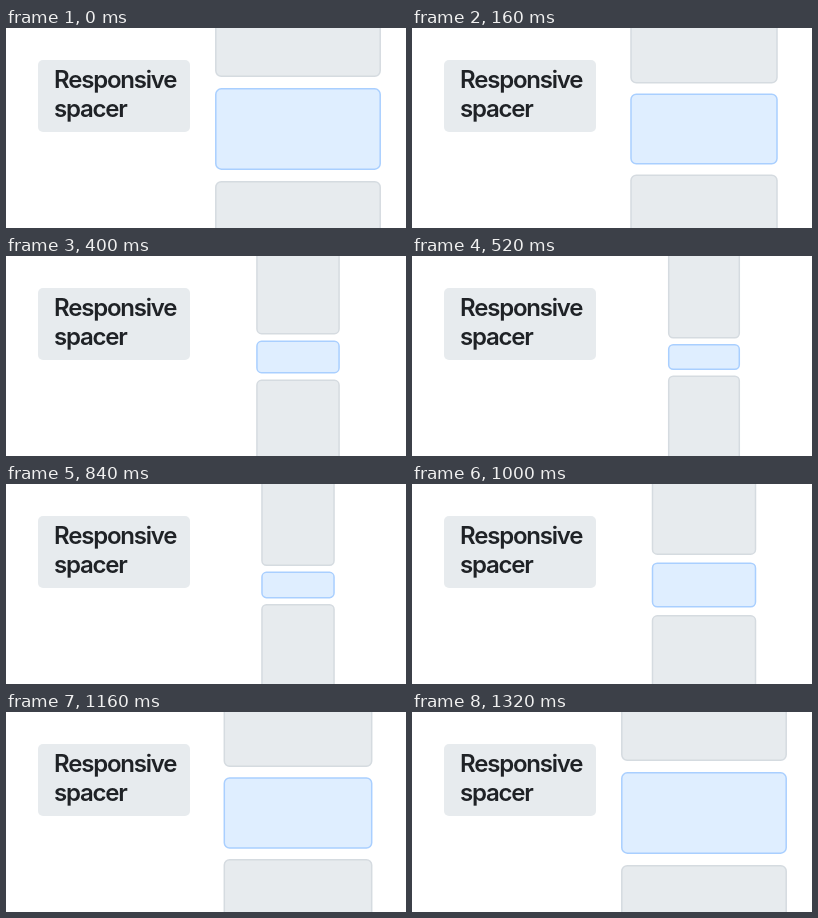
Recreate the animation shown at these times as an HTML page. Size 400 by 200 pixels, loop 1.52 s.

```html
<!DOCTYPE html>
<html lang="en">
<head>
<meta charset="utf-8">
<title>Responsive spacer</title>
<style>
  html, body { margin: 0; width: 100%; height: 100%; overflow: hidden; background: #fff; }
  svg { display: block; width: 400px; height: 200px; }
  text { font: 600 24px Inter, sans-serif; letter-spacing: -1.2px; fill: #1f2226; }
  .block { fill: #e7ebee; stroke: #d5dbe0; stroke-width: 1.5; }
  .spacer { fill: #dfeeff; stroke: #a9cfff; stroke-width: 1.5; }
</style>
</head>
<body>
<svg viewBox="0 0 400 200">
  <rect x="32" y="32" width="152" height="72" rx="5" fill="#e7ebee"/>
  <text x="48" y="60">Responsive</text>
  <text x="48" y="89">spacer</text>
  <rect id="above" class="block"/>
  <rect id="spacer" class="spacer"/>
  <rect id="below" class="block"/>
</svg>
<script>
const LOOP = 1520, STEP = 40, DURATION = 500;
const SHRINK_AT = 14, GROW_AT = 800;
const CENTER_X = 292, CENTER_Y = 101, BLOCK_HEIGHT = 200;
const [above, spacer, below] = ['above', 'spacer', 'below'].map(id => document.getElementById(id));

const mix = (a, b, p) => a + (b - a) * p;

function ease(elapsed) {
  const t = Math.min(1, Math.max(0, elapsed / DURATION));
  return (1 - Math.cos(Math.PI * t)) / 2;
}

function place(rect, halfWidth, y, height, radius) {
  const box = { x: CENTER_X - halfWidth, y, width: 2 * halfWidth, height, rx: radius };
  for (const key in box) rect.setAttribute(key, box[key]);
}

function draw(now) {
  const time = Math.floor((now % LOOP) / STEP) * STEP;
  const p = ease(time - SHRINK_AT) - ease(time - GROW_AT);
  const halfWidth = mix(82.2, 35.3, p);
  const halfHeight = mix(40.2, 12.2, p);
  const gap = mix(12.5, 7, p);
  const radius = mix(5.5, 4.5, p);
  const reach = halfHeight + gap;

  place(above, halfWidth, CENTER_Y - reach - BLOCK_HEIGHT, BLOCK_HEIGHT, radius);
  place(spacer, halfWidth, CENTER_Y - halfHeight, 2 * halfHeight, radius);
  place(below, halfWidth, CENTER_Y + reach, BLOCK_HEIGHT, radius);
}

const start = performance.now();
function tick() {
  draw(performance.now() - start);
  requestAnimationFrame(tick);
}
tick();
</script>
</body>
</html>
```
